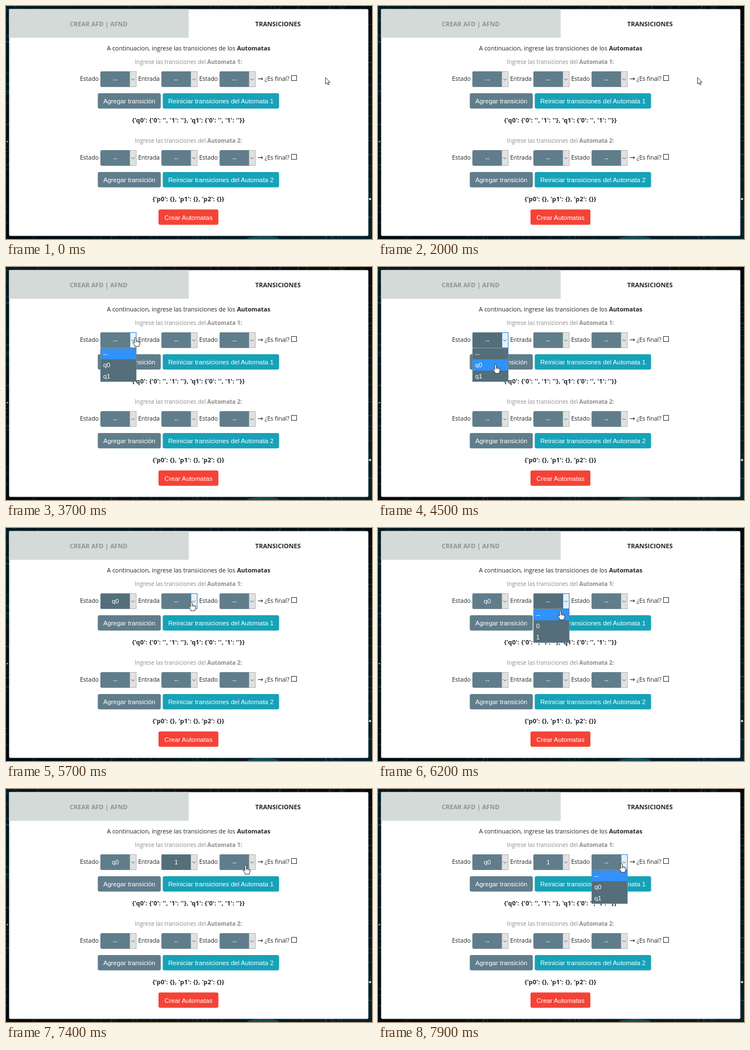
Animation, 648 px wide and 414 px high, one loop 8 s. Source, as an HTML page:

```html
<!DOCTYPE html>
<html lang="es">
<head>
<meta charset="utf-8">
<title>Transiciones</title>
<style>
html, body { margin: 0; height: 100%; overflow: hidden; background: #02141a; }
svg { display: block; width: 648px; height: 414px; font: 10.5px "Open Sans", "Noto Sans", sans-serif; fill: #212529; }
.ui { font: 11.35px "Liberation Sans", Arial, sans-serif; fill: #fff; }
.mid { text-anchor: middle; }
.bold, tspan { font-weight: 700; }
.hint { font-size: 10px; fill: #8b8b8b; }
.arrow { font: 12px "DejaVu Sans", sans-serif; }
.dict { font-size: 11px; letter-spacing: .2px; }
</style>
</head>
<body>
<svg viewBox="0 0 648 414">
  <defs>
    <linearGradient id="night" x2="1" y2="1">
      <stop stop-color="#031a22"/><stop offset=".5" stop-color="#02090d"/><stop offset="1" stop-color="#04222b"/>
    </linearGradient>
  </defs>
  <g id="page"></g>
  <g id="live"></g>
</svg>
<script>
const LOOP = 8000, STEP = 100;
const SLATE = '#607d8b', DARK = '#546e7a';
const selectX = [167, 275, 378];
const options = [['--', 'q0', 'q1'], ['--', '0', '1'], ['--', 'q0', 'q1']];
const opened = [[3500, 4800], [5800, 6650], [7700, 8000]];
const focused = [[2950, 4800], [5500, 6750], [7500, 8000]];
const chosen = [[4800, 'q0'], [6750, '1']];
// time, x, y of the pointer tip
const route = [
  [0, 565.7, 127], [2000, 565.7, 127], [2900, 229, 126], [3900, 229, 125], [4400, 208, 173],
  [4850, 208, 173], [5550, 328, 131], [6050, 328, 131], [6500, 307.5, 193],
  [6800, 307.5, 193], [7500, 431, 132], [8000, 431, 132]
];

const text = (x, y, s, cls = '', attrs = '') => `<text x="${x}" y="${y}" class="${cls}" ${attrs}>${s}</text>`;
const rect = (x, y, w, h, fill, attrs = '') =>
  `<rect x="${x}" y="${y}" width="${w}" height="${h}" fill="${fill}" ${attrs}/>`;
const path = (d, attrs) => `<path d="${d}" ${attrs}/>`;
const within = (t, span) => span && t >= span[0] && t < span[1];

function button(x, y, w, fill, label) {
  return rect(x, y, w, 27.2, fill, 'rx="3"') + text(x + w / 2, y + 18, label, 'ui mid');
}

function select(x, y, value, fill = SLATE, focus = false) {
  return rect(x + .5, y + .5, 63, 27, fill, 'rx="2" stroke="#718893"') +
    rect(x + 52.5, y + .5, 11, 27, focus ? '#e5f1fb' : '#e1e1e1', `stroke="${focus ? '#2f8ad8' : '#b4b8ba'}"`) +
    path(`M${x + 55} ${y + 13}l2.8 2.8l2.8 -2.8`, 'fill="none" stroke="#555"') +
    text(x + 26.5, y + 18, value, 'ui mid');
}

function section(n, y, dict) {
  return text(323, y + 3, `Ingrese las transiciones del <tspan>Automata ${n}:</tspan>`, 'hint mid') +
    text(131, y + 33, 'Estado') + text(234, y + 33, 'Entrada') + text(342, y + 33, 'Estado') +
    text(445, y + 33, '→', 'arrow') + text(458, y + 33, '¿Es final?') +
    rect(505.5, y + 23.5, 9, 9, '#fff', 'stroke="#333"') +
    selectX.map(x => select(x, y + 16, '--')).join('') +
    button(162.5, y + 55, 111.5, SLATE, 'Agregar transición') +
    button(277.5, y + 55, 206, '#17a2b8', `Reiniciar transiciones del Automata ${n}`) +
    text(323, y + 107, dict, 'bold mid dict');
}

function menu(x, items, hot) {
  return rect(x + .5, 144, 63, 60, DARK) +
    items.map((s, i) => (i === hot ? rect(x + 1, 144 + 20 * i, 62, 20, '#3092fa') : '') +
      text(x + 5, 158 + 20 * i, s, 'ui')).join('') +
    rect(x + .5, 144.5, 63, 59, 'none', 'stroke="#6d8792"');
}

function pointer(x, y, hand) {
  const shape = hand
    ? 'M-1.4 1Q0 -1 1.4 1V6.2Q3 5.3 4 6.6Q5.6 6 6.3 7.4Q8 7 8.1 8.8V11.5L6.7 14V16H-1V14L-4.6 9.5Q-4 7.6 -1.4 9.6Z'
    : 'M0 0V11.5L2.7 9.1L4.5 13.2L6.3 12.4L4.6 8.5H8Z';
  return path(shape, `transform="translate(${x} ${y})" fill="#fff" stroke="#222" stroke-width=".9" stroke-linejoin="round"`) +
    (hand ? path('M1.4 6V9M4 6.6V9.3M6.3 7.4V9.6', `transform="translate(${x} ${y})" fill="none" stroke="#222" stroke-width=".7"`) : '');
}

function position(t) {
  const i = Math.max(1, route.findIndex(p => t < p[0]));
  const [t0, x0, y0] = route[i - 1], [t1, x1, y1] = route[i];
  const u = (t - t0) / (t1 - t0), e = u * u * (3 - 2 * u);
  return [x0 + (x1 - x0) * e, y0 + (y1 - y0) * e];
}

function draw(t) {
  const [x, y] = position(t);
  let out = '', hand = false;
  selectX.forEach((sx, i) => {
    const [start, end] = opened[i], open = within(t, opened[i]);
    const value = chosen[i] && t >= chosen[i][0] ? chosen[i][1] : '--';
    const over = x >= sx && x < sx + 64 && y >= 116 && y < (open ? 204 : 144);
    const dark = within(t, [start + 400, end + 1200]);
    hand ||= over;
    out += select(sx, 116, value, dark ? DARK : SLATE, within(t, focused[i]));
    if (open) out += menu(sx, options[i], over && y > 144 ? Math.floor((y - 144) / 20) : 0);
  });
  live.innerHTML = out + pointer(x, y, hand);
}

// faint threads of light that show only around the panel
function threads() {
  let seed = 7, d = '';
  const rnd = n => (seed = seed * 16807 % 2147483647) / 2147483647 * n;
  for (let i = 0; i < 26; i++) d += `M${rnd(648)} -10L${rnd(648)} 424M-10 ${rnd(414)}L658 ${rnd(414)}`;
  return path(d, 'fill="none" stroke="#3f8490" stroke-opacity=".45" stroke-width=".8"') +
    '<circle cx="644.5" cy="343" r="2" fill="#d5e5e5"/><circle cx="2.5" cy="241" r="1.3" fill="#a9bcbf"/>' +
    '<ellipse cx="455" cy="413" rx="28" ry="4" fill="#1b6672" opacity=".6"/>';
}

const page = document.getElementById('page'), live = document.getElementById('live');
page.innerHTML =
  rect(0, 0, 648, 414, 'url(#night)') + threads() +
  rect(5.5, 5.5, 636, 403, '#fff', 'rx="2"') +
  rect(5.5, 5.5, 318, 51, '#d3dad8') +
  text(164, 36, 'CREAR AFD | AFND', 'bold mid', 'style="font-size:11px;fill:#8b9693"') +
  text(481.5, 36, 'TRANSICIONES', 'bold mid', 'style="font-size:11px"') +
  text(323.3, 78.5, 'A continuacion, ingrese las transiciones de los <tspan>Automatas</tspan>', 'mid', 'style="font-size:10.7px"') +
  section(1, 100, "{'q0': {'0': '', '1': ''}, 'q1': {'0': '', '1': ''}}") +
  section(2, 240, "{'p0': {}, 'p1': {}, 'p2': {}}") +
  button(270, 361.5, 106, '#f44336', 'Crear Automatas');

function tick(now) {
  draw(Math.floor(now % LOOP / STEP) * STEP);
  requestAnimationFrame(tick);
}
draw(0);
requestAnimationFrame(tick);
</script>
</body>
</html>
```
